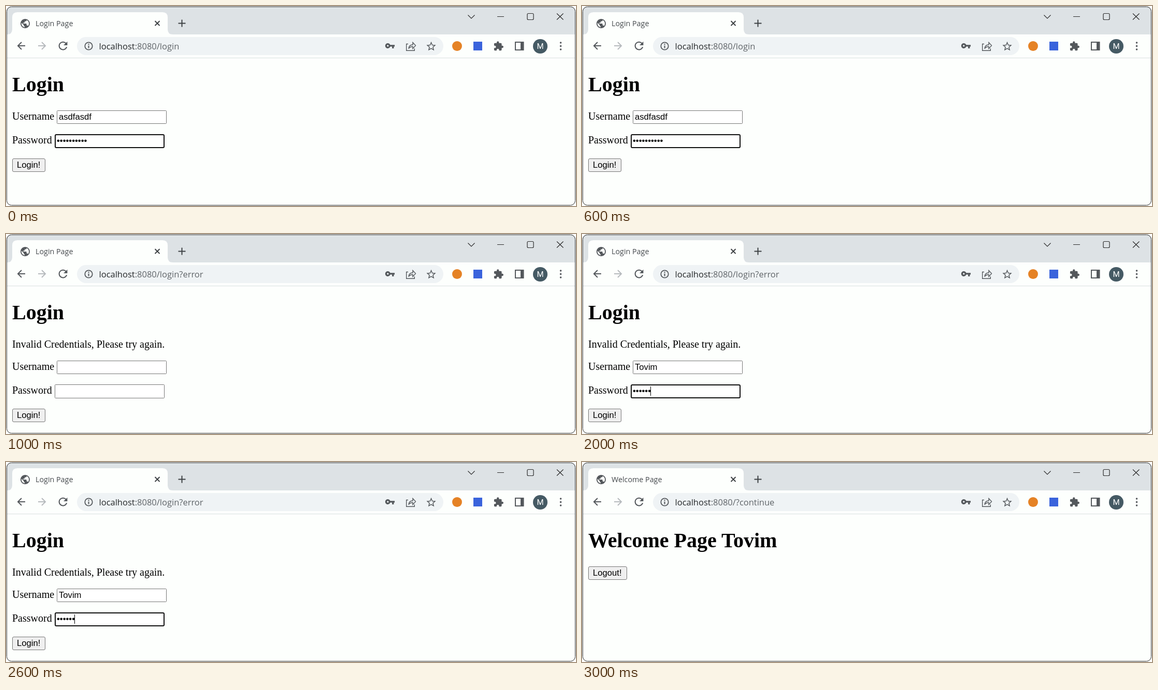
An HTML page for the animation above (4000 ms loop, 1100 px wide and 387 px high).

```html
<!DOCTYPE html>
<html lang="en">
<head>
<meta charset="utf-8">
<title>Login flow</title>
<style>
  html, body { margin: 0; width: 100%; height: 100%; overflow: hidden; background: #fff; }
  svg { display: block; width: 1100px; height: 387px; }
  text { white-space: pre; }
  .ui { font-family: "Open Sans", "Noto Sans", sans-serif; }
  .body { font: 20px "Liberation Serif", "Times New Roman", serif; }
  .head { font: bold 40px "Liberation Serif", "Times New Roman", serif; }
  .field { font: 16.67px "Liberation Sans", Arial, sans-serif; }
  .line { fill: none; stroke: #54585c; stroke-width: 2; }
  .thin { fill: none; stroke: #2b2b2b; stroke-width: 1.2; }
  .icon { fill: #54585c; }
</style>
</head>
<body>
<svg viewBox="0 0 1100 387">
  <defs>
    <clipPath id="frame"><rect x="1" y="1" width="1098" height="385" rx="9"/></clipPath>
  </defs>

  <g clip-path="url(#frame)">
    <rect width="1100" height="387" fill="#fdfffd"/>
    <rect width="1100" height="55" fill="#dde2e5"/>
    <path fill="#fdfffd" d="M2 55q10 0 10-10V22q0-10 10-10H302q10 0 10 10V45q0 10 10 10z"/>
    <path d="M0 100.5H1100" stroke="#dadfe1"/>
  </g>
  <rect x="1.5" y="1.5" width="1097" height="384" rx="9" fill="none" stroke="#2c2e2f"/>

  <!-- tab strip -->
  <path class="icon" transform="translate(26.2 23.2) scale(.9)" d="M12 2C6.48 2 2 6.48 2 12s4.48 10 10 10 10-4.48 10-10S17.52 2 12 2zm-1 17.93c-3.95-.49-7-3.85-7-7.93 0-.62.08-1.21.21-1.79L9 15v1c0 1.1.9 2 2 2v1.93zm6.9-2.54c-.26-.81-1-1.39-1.9-1.39h-1v-3c0-.55-.45-1-1-1H8v-2h2c.55 0 1-.45 1-1V7h2c1.1 0 2-.9 2-2v-.41c2.93 1.19 5 4.06 5 7.41 0 2.08-.8 3.97-2.1 5.39z"/>
  <text id="title" class="ui" x="57" y="39" font-size="14.3" fill="#45494d"></text>
  <path class="line" style="stroke:#3c4043" d="M287.5 29l9 9m0-9l-9 9M339.5 26.5v14m-7-7h14"/>
  <path class="thin" d="M891.5 17.5l6.5 6.5 6.5-6.5M948 20.5h13M1063 14.5l12.500 12m0-12l-12.500 12"/>
  <rect class="thin" x="1006" y="14.500" width="12" height="12" rx="2"/>

  <!-- toolbar -->
  <path class="line" d="M37 77H23m7-7l-7 7 7 7"/>
  <path class="line" style="stroke:#b6babd" d="M62 77h14m-7-7l7 7-7 7"/>
  <path class="icon" transform="translate(97.400 64.500) scale(1.05)" d="M17.65 6.35C16.2 4.9 14.21 4 12 4c-4.42 0-7.99 3.58-7.99 8s3.57 8 7.99 8c3.73 0 6.84-2.55 7.73-6h-2.080c-.82 2.33-3.04 4-5.65 4-3.31 0-6-2.69-6-6s2.69-6 6-6c1.66 0 3.14.69 4.22 1.78L13 11h7V4l-2.35 2.35z"/>
  <rect x="137" y="60" width="707" height="35" rx="17.5" fill="#eff3f5"/>
  <circle class="line" style="stroke-width:1.8" cx="159.500" cy="77.500" r="7.200"/>
  <path class="line" d="M159.500 76.500v5m0-8.500v2"/>
  <text class="ui" x="179.500" y="84" font-size="16.5" fill="#5f6468"><tspan fill="#25282a">localhost</tspan>:8080/<tspan id="path"></tspan></text>
  <path class="icon" transform="translate(731 67) scale(.83)" d="M12.65 10C11.83 7.67 9.61 6 7 6c-3.31 0-6 2.69-6 6s2.69 6 6 6c2.61 0 4.83-1.67 5.65-4H17v4h4v-4h2v-4H12.65zM7 14c-1.1 0-2-.9-2-2s.9-2 2-2 2 .9 2 2-.9 2-2 2z"/>
  <path class="line" style="stroke-width:1.4" d="M776 73.500h-3.300v12.800h15.600v-4M777 82.500c.5-5 3.500-7.500 8-7.500v-4.500l5.500 6-5.500 6v-4c-4 0-6 1-8 4z"/>
  <path class="icon" transform="translate(809.500 67) scale(.92)" d="M22 9.24l-7.19-.62L12 2 9.19 8.63 2 9.24l5.46 4.73L5.82 21 12 17.27 18.18 21l-1.63-7.03L22 9.24zM12 15.4l-3.76 2.27 1-4.28-3.32-2.88 4.38-.38L12 6.100l1.71 4.04 4.38.38-3.32 2.88 1 4.28L12 15.4z"/>
  <circle cx="870.500" cy="77.500" r="9.500" fill="#e58225"/>
  <rect x="902" y="69" width="17" height="17" fill="#3a63dc"/>
  <path class="icon" transform="translate(940.200 67.400) scale(.86)" d="M20.5 11H19V7c0-1.1-.9-2-2-2h-4V3.5C13 2.12 11.88 1 10.5 1S8 2.12 8 3.5V5H4c-1.1 0-1.99.9-1.99 2v3.8H3.5c1.49 0 2.7 1.21 2.7 2.7s-1.21 2.7-2.7 2.7H2V20c0 1.1.9 2 2 2h3.8v-1.500c0-1.49 1.21-2.7 2.7-2.7 1.49 0 2.7 1.21 2.7 2.7V22H17c1.1 0 2-.9 2-2v-4h1.500c1.38 0 2.5-1.12 2.5-2.5S21.88 11 20.5 11z"/>
  <rect class="line" x="983" y="70" width="15.500" height="15" />
  <rect class="icon" x="993" y="70" width="5.500" height="15"/>
  <circle cx="1031" cy="78" r="14" fill="#455a64"/>
  <text x="1031" y="83.300" text-anchor="middle" font-family="Roboto, sans-serif" font-size="15" fill="#fff">M</text>
  <g class="icon">
    <circle cx="1070.500" cy="71" r="1.800"/>
    <circle cx="1070.500" cy="77.500" r="1.800"/>
    <circle cx="1070.500" cy="84" r="1.800"/>
  </g>

  <g id="page"></g>
</svg>

<script>
const STEP = 1000;
const $ = id => document.getElementById(id);

const text = (cls, x, y, s) => `<text class="${cls}" x="${x}" y="${y}">${s}</text>`;

const box = (x, y, w, h, fill, stroke, weight, r) =>
  `<rect x="${x + weight / 2}" y="${y + weight / 2}" width="${w - weight}" height="${h - weight}"
    rx="${r}" fill="${fill}" stroke="${stroke}" stroke-width="${weight}"/>`;

const input = (x, y, h, value, focus) =>
  (focus ? box(x, y, 212, h, "#fff", "#101010", 2, 2) : box(x, y, 212, h, "#fff", "#767676", 1, 1)) +
  text("field", x + 4, y + 18, value);

const button = (y, w, label) =>
  box(12, y, w, 26, "#efefef", "#767676", 1, 2.5) + text("field", 21, y + 18, label);

// The form moves down by one paragraph when an error is shown.
function loginPage({ error, user = "", dots = 0, caret }) {
  const y = error ? 245 : 202;
  return text("head", 12, 165, "Login") +
    (error ? text("body", 12, 220, "Invalid Credentials, Please try again.") : "") +
    text("body", 12, y + 18, "Username") + input(98, y, 26, user) +
    text("body", 12, y + 64, "Password") + input(94, y + 46, 27, "•".repeat(dots), dots > 0) +
    (caret ? `<rect x="132" y="${y + 50}" width="1" height="18"/>` : "") +
    button(y + 93, 64, "Login!");
}

const user = "Tovim";
const steps = [
  { title: "Login Page", path: "login", page: loginPage({ user: "asdfasdf", dots: 10 }) },
  { title: "Login Page", path: "login?error", page: loginPage({ error: true }) },
  { title: "Login Page", path: "login?error", page: loginPage({ error: true, user, dots: 6, caret: true }) },
  { title: "Welcome Page", path: "?continue",
    page: text("head", 12, 165, `Welcome Page ${user}`) + button(202, 75, "Logout!") }
];

let shown = -1;
function show(i) {
  if (i === shown) return;
  shown = i;
  $("title").textContent = steps[i].title;
  $("path").textContent = steps[i].path;
  $("page").innerHTML = steps[i].page;
}

const start = performance.now();
function tick() {
  const t = Math.max(0, performance.now() - start);
  show(Math.floor(t / STEP) % steps.length);
  requestAnimationFrame(tick);
}
tick();
</script>
</body>
</html>
```
